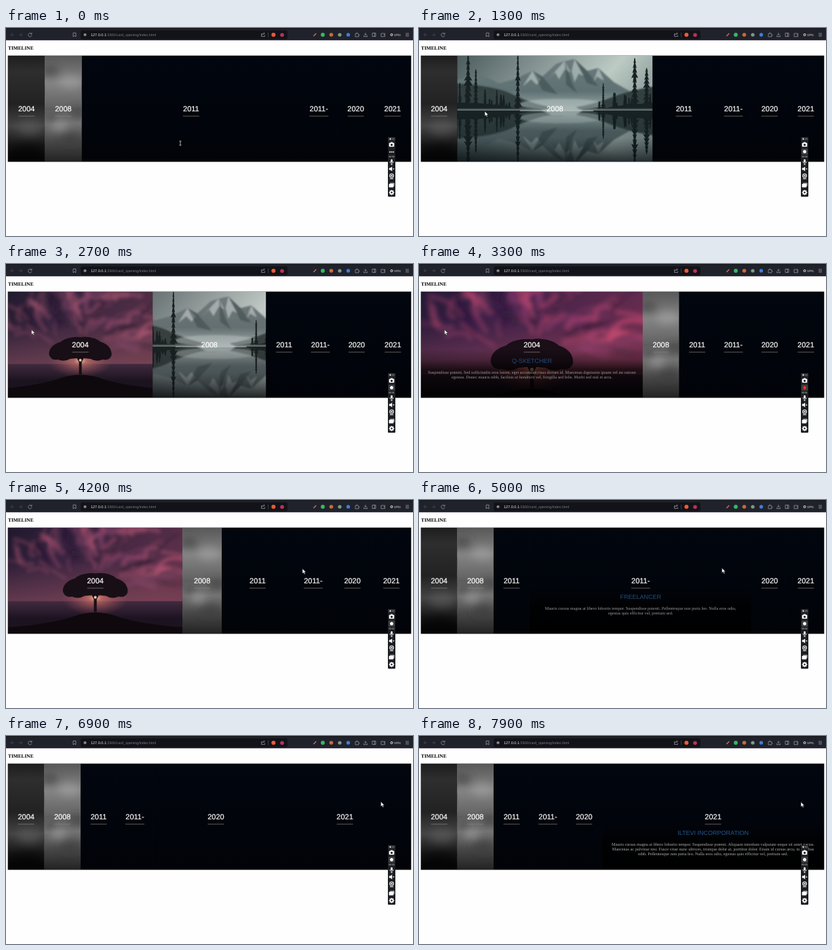
These frames come from a looping animation (600 by 307 pixels, 8000 ms). An HTML page:

```html
<!DOCTYPE html>
<html lang="en">
<head>
<meta charset="utf-8">
<title>Timeline</title>
<style>
html, body { margin: 0; width: 100%; height: 100%; overflow: hidden; background: #fefefe; }
svg { display: block; }
text { text-rendering: geometricPrecision; }
.sans { font-family: "Liberation Sans", Arial, sans-serif; }
.serif { font-family: "Liberation Serif", Times, serif; }
.mid { text-anchor: middle; }
.line { fill: none; stroke: #a3a5ae; stroke-width: .7; }
</style>
</head>
<body>
<svg id="stage" width="600" height="307" viewBox="0 0 600 307">
  <defs>
    <linearGradient id="night" x2="0" y2="1"><stop stop-color="#01060f"/><stop offset="1" stop-color="#010308"/></linearGradient>
    <linearGradient id="dusk" y2=".35"><stop stop-color="#1f1732"/><stop offset=".4" stop-color="#3d2148"/><stop offset="1" stop-color="#682c4e"/></linearGradient>
    <linearGradient id="low" x2="0" y2="1"><stop offset=".45" stop-color="#a34c5c" stop-opacity="0"/><stop offset="1" stop-color="#a34c5c" stop-opacity=".5"/></linearGradient>
    <linearGradient id="sea" x2="0" y2="1"><stop stop-color="#472845"/><stop offset=".5" stop-color="#1e1223"/></linearGradient>
    <radialGradient id="glow"><stop stop-color="#ffb98c"/><stop offset=".2" stop-color="#e56a5c" stop-opacity=".75"/><stop offset="1" stop-color="#b0405a" stop-opacity="0"/></radialGradient>
    <linearGradient id="mist" y2=".25"><stop stop-color="#46575b"/><stop offset=".45" stop-color="#869795"/><stop offset=".8" stop-color="#bccbc4"/><stop offset="1" stop-color="#98a8a4"/></linearGradient>
    <linearGradient id="rock" x2="0" y2="1"><stop offset=".1" stop-color="#68797c"/><stop offset=".6" stop-color="#5d7174"/><stop offset="1" stop-color="#a5b8b6"/></linearGradient>
    <linearGradient id="deep" x2="0" y2="1"><stop stop-color="#0c1c22" stop-opacity=".12"/><stop offset=".5" stop-color="#0a171c" stop-opacity=".32"/><stop offset="1" stop-color="#050c10" stop-opacity=".88"/></linearGradient>
    <linearGradient id="shade" x2="0" y2="1"><stop stop-color="#000" stop-opacity="0"/><stop offset=".22" stop-color="#000" stop-opacity=".3"/><stop offset=".42" stop-color="#000" stop-opacity=".75"/><stop offset="1" stop-color="#000" stop-opacity=".92"/></linearGradient>
    <linearGradient id="haze0" x2="0" y2="1"><stop stop-color="#1e1e1e"/><stop offset=".15" stop-color="#2e2e2e"/><stop offset=".45" stop-color="#222"/><stop offset=".66" stop-color="#444"/><stop offset=".84" stop-color="#141414"/><stop offset="1" stop-color="#060606"/></linearGradient>
    <linearGradient id="haze1" x2="0" y2="1"><stop stop-color="#585858"/><stop offset=".25" stop-color="#858585"/><stop offset=".5" stop-color="#606060"/><stop offset=".64" stop-color="#757575"/><stop offset=".8" stop-color="#484848"/><stop offset="1" stop-color="#222"/></linearGradient>
    <filter id="soft" x="-50%" y="-50%" width="200%" height="200%"><feGaussianBlur stdDeviation="6"/></filter>
    <filter id="cloud"><feGaussianBlur stdDeviation="2.6"/></filter>
    <filter id="far"><feGaussianBlur stdDeviation="1"/></filter>
  </defs>
  <rect width="600" height="307" fill="#fefefe"/>
  <g id="bar"></g>
  <text class="serif" x="3" y="32" font-size="7.35" font-weight="bold" fill="#000">TIMELINE</text>
  <g id="cards"></g>
  <g id="tool"></g>
  <g id="arrow"><path d="M0 0V7L1.7 5.5 2.9 8.1 4.1 7.6 2.9 5.1H5.1Z" fill="#fff" stroke="#222" stroke-width=".5"/></g>
  <path id="beam" d="M-1.5-3H1.5M-1.5 3H1.5M0-3V3" stroke="#ddd" stroke-width=".8"/>
</svg>
<script>
const $ = id => document.getElementById(id);
let seed = 11;
const rnd = (a, b) => a + (b - a) * ((seed = seed * 16807 % 2147483647) / 2147483647);
const many = (n, f) => Array.from({ length: n }, (_, i) => f(i)).join('');
const dot = (x, y, r, fill) => `<circle cx="${x}" cy="${y}" r="${r}" fill="${fill}"/>`;
const box = (x, y, w, h, fill, r = 0) => `<rect x="${x}" y="${y}" width="${w}" height="${h}" rx="${r}" fill="${fill}"/>`;
const line = (d, extra = '') => `<path class="line" d="${d}" ${extra}/>`;

// Browser bar
$('bar').innerHTML = box(0, 0, 600, 18, '#20222b') + box(0, 0, 600, 1.2, '#15161c') +
  box(0, 17.5, 600, .7, '#352f41') + box(110, 3.5, 305, 13, '#121319', 3) +
  line('M12 10H7M9.5 7.5 7 10l2.5 2.5M19 10h5M21.5 7.5 24 10l-2.5 2.5', 'style="stroke:#4b4e58"') +
  line('M37.6 8.6A2.7 2.7 0 1 0 38 11M38 6.8v2.2h-2.2M99 7.3h4v5.6l-2-1.7-2 1.7Z') + dot(116.5, 10, 2, '#a3a5ae') +
  box(116.1, 9.6, .8, 1.7, '#14151b') +
  `<text class="sans" x="125" y="12" font-size="5.5" fill="#eee">127.0.0.1<tspan font-size="5.35" fill="#777a84">:5500/card_opening/index.html</tspan></text>` +
  line('M378 8.5h-1.5v4h5v-2M378 10.5q0-2.5 3-2.5M379.7 6.5 381.3 8l-1.6 1.5') + box(386, 6.5, .6, 7, '#555863') +
  dot(394.3, 10, 3, '#ef5a35') + dot(407, 10.2, 2.8, '#b8325e') +
  line('M453.3 12 457.3 8', 'style="stroke:#d9704f;stroke-width:1.3"') +
  dot(467, 10, 2.9, '#35b866') + dot(479.5, 10, 2.8, '#c96c33') + dot(492, 10, 2.6, '#7f9b8b') + dot(504.5, 10, 2.7, '#3b7de0') +
  line('M515 8.5h1.4a1 1 0 1 1 1.8 0h1.3v1.3a1 1 0 1 1 0 1.8v1.3H515ZM530 7v3.5M528.3 9l1.7 1.7L531.7 9M527.5 11v1.7h5V11') +
  line('M540 7.5h5v5h-5ZM543.3 7.5v5M553 8h5.5v4.7H553ZM556.5 10h2') + dot(568.5, 10, 2, '#c9cad2') + dot(568.5, 10, .9, '#20222b') +
  `<text class="sans" x="572" y="12" font-size="4.7" fill="#ddd">VPN</text>` + line('M589 8h5M589 10h5M589 12h5');

// Scenes: x is centred on 0, y runs from 0 to 156
const tints = ['#e0507a', '#b8486f', '#8c3a70', '#251533'];
const streak = i => {
  const a = rnd(-2.7, -.1), r = rnd(40, 120), q = r + rnd(15, 50), b = a + rnd(-.1, .25);
  const p = (g, d) => `${(Math.cos(g) * d).toFixed(1)} ${(90 + Math.sin(g) * d * .75).toFixed(1)}`;
  return `<path d="M${p(a, r)}Q${p(a + rnd(-.15, .15), (r + q) / 2)} ${p(b, q)}" stroke="${tints[i % 4]}" stroke-width="${rnd(3, 9).toFixed(1)}" opacity="${rnd(.2, a > -1.9 ? .55 : .3).toFixed(2)}"/>`;
};
const tree = box(-130, 0, 260, 108, 'url(#dusk)') + '<g filter="url(#cloud)" fill="none" stroke-linecap="round">' + many(90, streak) + '</g>' +
  box(-130, 0, 260, 108, 'url(#low)') + box(-130, 106.5, 260, 50, 'url(#sea)') +
  '<ellipse cx="0" cy="102" rx="48" ry="25" fill="url(#glow)"/>' +
  '<path d="M-130 144Q-60 139-28 127Q0 118 28 127Q60 139 130 144V158H-130Z" fill="#10080f"/>' +
  '<path d="M-46 93C-47 84-40 77-29 74C-22 68-10 66 0 67C10 65 24 68 30 74C41 77 47 85 46 94Q43 102 33 100Q24 104 15 99L5 98 2 104 2 122H-2L-2 104-5 98-15 99Q-24 104-33 100Q-43 102-46 93Z" fill="#1a0e17"/>' +
  dot(0, 101, 2, '#ffc09a');

const spruce = (x, base, h, w) => {
  let l = '', r = '';
  for (let k = 1; k <= 10; k++) {
    const y = base - h + h * k / 10.5, d = w * (.25 + k * .075) * rnd(.5, 1.2);
    const edge = s => `L${(x + s * d).toFixed(1)} ${y.toFixed(1)}L${(x + s * d * .35).toFixed(1)} ${(y - .8).toFixed(1)}`;
    l += edge(-1);
    r += edge(1);
  }
  const half = s => `<path d="M${x} ${base - h}${s}L${x} ${base}Z"/>`;
  return half(l) + half(r) + box(x - .6, base - h, 1.2, h, '#141f21');
};
const shore = box(-145, 0, 290, 82, 'url(#mist)') + '<g filter="url(#far)">' +
  '<path d="M-145 38-105 30-80 42-58 36-32 24-18 32 2 14 14 10 28 7 46 24 62 20 84 40 112 56 145 60V84H-145Z" fill="url(#rock)"/>' +
  '<path d="M-32 24-20 36-26 44-34 36-46 46ZM14 10 22 26 14 22 6 36 0 26-12 38ZM28 7 42 32 34 28 28 40 24 24ZM62 20 70 38 60 32 54 42Z" fill="#b5c4c2" opacity=".7"/>' +
  '<path d="M-32 24-18 32 4 58-18 52ZM28 7 46 24 62 46 46 42ZM14 10 24 40 32 56 16 44Z" fill="#33474b" opacity=".5"/>' +
  '<path d="M-145 42Q-85 44-55 60Q-30 72-5 76L-20 83H-145ZM145 46Q105 52 80 62Q55 72 30 76L40 83H145Z" fill="#31413f"/>' +
  '<ellipse cx="10" cy="72" rx="60" ry="8" fill="#b3c3c1" opacity=".5"/></g>' +
  '<g fill="#182325">' + many(26, i => {
    const x = +rnd(50, 140).toFixed(1) * (i % 2 ? 1 : -1);
    return spruce(x, 80, rnd(8, 12 + Math.abs(x) * .2), 4);
  }) + spruce(-124, 80, 80, 8) + spruce(-113, 80, 58, 5) + spruce(-53, 80, 80, 6) + spruce(69, 80, 38, 4) + spruce(114, 80, 74, 8) + spruce(131, 80, 60, 7) +
  '<path d="M-145 70Q-100 68-60 77L-30 82H-145ZM145 70Q95 72 70 78L50 82H145Z"/></g>';
const lake = `<g id="shore">${shore}</g><use href="#shore" transform="matrix(1 0 0 -1 0 163)"/>` +
  box(-145, 81.5, 290, 76, 'url(#deep)') + box(-50, 80.6, 105, 1, '#b5c4c2', .5);

const blobs = (list, fill) => '<g filter="url(#soft)">' + list.map(([x, y, r]) => `<ellipse cx="${x}" cy="${y}" rx="${r}" ry="${r * .6}" fill="${fill}" opacity=".55"/>`).join('') + '</g>';
const hazes = [
  box(-60, 0, 120, 157, 'url(#haze0)') + blobs([[0, 152, 30]], '#000') + blobs([[4, 106, 18]], '#5c5c5c'),
  box(-60, 0, 120, 157, 'url(#haze1)') + blobs([[-20, 22, 14], [22, 84, 14], [-18, 92, 10], [12, 122, 16]], '#3a3a3a') + blobs([[10, 38, 16], [-6, 104, 12]], '#a5a5a5')
];

// Cards: year, title, text, hover changes [ms, open], scene and its width
const OPEN = 500;
const cards = [
  { year: '2004', title: 'Q-SKETCHER', hover: [[2532, 1], [4095, 0]], art: tree, size: 248,
    text: ['Suspendisse potenti. Sed sollicitudin eros lorem, eget accumsan risus dictum id. Maecenas dignissim ipsum vel mi rutrum', 'egestas. Donec mauris nibh, facilisis ut hendrerit vel, fringilla sed felis. Morbi sed nisl et arcu.'] },
  { year: '2008', title: 'ANIMATOR', hover: [[1020, 1], [2532, 0]], art: lake, size: 279,
    text: ['Maecenas dignissim ipsum vel mi rutrum egestas. Donec mauris nibh, facilisis ut hendrerit vel, fringilla sed felis.', 'Suspendisse potenti. Sed sollicitudin eros lorem, eget accumsan risus dictum id.'] },
  { year: '2011', title: 'WEB DEVELOPER', hover: [[-380, 1], [1020, 0], [4130, 1], [4200, 0]],
    text: ['Aliquam interdum vulputate neque sit amet varius. Maecenas ac pulvinar nisi. Fusce vitae nunc ultrices, tristique dolor', 'at, porttitor dolor. Etiam id cursus arcu, in dapibus nibh.'] },
  { year: '2011-', title: 'FREELANCER', hover: [[4200, 1], [5570, 0]],
    text: ['Mauris cursus magna at libero lobortis tempor. Suspendisse potenti. Pellentesque non porta leo. Nulla eros odio,', 'egestas quis efficitur vel, pretium sed.'] },
  { year: '2020', title: 'TEAM LEADER', hover: [[5570, 1], [6750, 0]],
    text: ['Fusce vitae nunc ultrices, tristique dolor at, porttitor dolor. Etiam id cursus arcu, in dapibus nibh. Pellentesque', 'non porta leo. Nulla eros odio, egestas quis efficitur vel, pretium sed.'] },
  { year: '2021', title: 'ILTEVI INCORPORATION', hover: [[6750, 1]],
    text: ['Mauris cursus magna at libero lobortis tempor. Suspendisse potenti. Aliquam interdum vulputate neque sit amet varius.', 'Maecenas ac pulvinar nisi. Fusce vitae nunc ultrices, tristique dolor at, porttitor dolor. Etiam id cursus arcu, in dapibus', 'nibh. Pellentesque non porta leo. Nulla eros odio, egestas quis efficitur vel, pretium sed.'] }
];
$('cards').innerHTML = box(2.7, 40.7, 594.6, 156.8, '#06070b') + cards.map(c => {
  const i = cards.indexOf(c), half = c.year.length > 4 ? 14 : 12;
  return `<svg class="card" y="41" height="156">
    <rect width="600" height="156" fill="url(#night)"/>
    <g class="art">${c.art || ''}</g>
    <g class="haze">${hazes[i] || ''}</g>
    <rect class="shade" y="85" width="600" height="71" fill="url(#shade)"/>
    <g class="mid label"><text class="sans" y="82" font-size="11" fill="#fff" stroke="#fff" stroke-width=".2">${c.year}</text>
      <rect x="${-half}" y="88.7" width="${2 * half}" height=".7" fill="#8a837a"/>
      <g class="info"><text class="sans" y="105.2" font-size="9" fill="#25588f">${c.title}</text>
      ${c.text.map((s, k) => `<text class="serif" y="${120.8 + 7.3 * k}" font-size="6.29" fill="#b4b4b4">${s}</text>`).join('')}</g></g>
  </svg>`;
}).join('');
document.querySelectorAll('.card').forEach((el, i) => {
  cards[i].el = el;
  for (const part of ['art', 'haze', 'shade', 'label', 'info']) cards[i][part] = el.querySelector('.' + part);
});

// Recorder panel
$('tool').innerHTML = box(563, 161, 11, 88, '#1d1e22', 1.2) + box(563, 161, 11, 5.5, '#2c2d32', 1) + dot(566.5, 163.8, 1.2, '#ddd') + box(569, 163.4, 3.5, .8, '#999') +
  box(564.7, 169.6, 7.6, 5.6, '#fff', 1) + box(566.8, 168.6, 3.4, 2, '#fff', .5) + dot(568.5, 172.4, 1.6, '#1d1e22') +
  '<g id="dots">' + many(3, i => dot(566 + 2.5 * i, 183, .9, '#fff')) + '</g>' +
  `<g id="rec">${line('M564.8 179h7.4v7h-7.4Z', 'style="stroke:#777"')}<circle id="led" cx="568.5" cy="182.5" r="2.5"/></g>` +
  '<text id="clock" class="sans mid" x="568.5" y="190.6" font-size="3.4" fill="#ddd"></text>' +
  box(567.2, 193.8, 2.6, 4.8, '#fff', 1.3) + line('M565.8 197a2.7 2.7 0 0 0 5.4 0M568.5 199.8v1.8M567 201.6h3', 'style="stroke:#fff"') +
  '<path d="M564.8 206.6h2l2.4-2v7l-2.4-2h-2Z" fill="#fff"/>' + line('M570.3 207l2 2M572.3 207l-2 2', 'style="stroke:#fff"') +
  dot(568.5, 218, 3.3, '#fff') + dot(568.5, 218, 2.2, '#1d1e22') + dot(568.5, 218, 1.2, '#fff') + box(565.8, 222, 5.4, 1, '#fff', .5) +
  box(566, 228.6, 6.6, 5, '#aaa', .7) + box(564.6, 230, 6.6, 5.2, '#fff', .7) +
  many(4, i => `<rect x="567.7" y="239" width="1.6" height="7.6" fill="#fff" transform="rotate(${45 * i} 568.5 242.8)"/>`) + dot(568.5, 242.8, 2.8, '#fff') + dot(568.5, 242.8, 1.2, '#1d1e22');

// Standard "ease" curve
function ease(x) {
  if (x <= 0) return 0;
  if (x >= 1) return 1;
  let a = 0, b = 1, u;
  for (let i = 0; i < 20; i++) {
    u = (a + b) / 2;
    if (.75 * u * (1 - u) + u ** 3 < x) a = u; else b = u;
  }
  return .3 * u * (1 - u) ** 2 + 3 * u * u * (1 - u) + u ** 3;
}
function state(hover, t) {
  let open = 0, fade = 0;
  hover.forEach(([from, to], i) => {
    if (t < from) return;
    const end = Math.min(t, hover[i + 1] ? hover[i + 1][0] : Infinity);
    const way = to - open;
    fade = to ? ease((t - from - OPEN) / OPEN) : 0;
    if (way) open += way * ease((end - from) / (OPEN * Math.abs(way)));
  });
  return { open, fade };
}
const path = [[0, 257, 170], [800, 257, 168], [1050, 108, 130], [1300, 97, 123], [2420, 90, 116], [2700, 37.5, 97], [3910, 37.5, 97],
  [4200, 437, 101.5], [5450, 452, 100], [5600, 495, 98], [6100, 528, 96.5], [6650, 530, 96.5], [6800, 550, 97], [7300, 563, 97.5], [8000, 563, 97.5]];
function pointer(t) {
  const i = path.findIndex(p => p[0] > t), [t0, x0, y0] = path[i - 1], [t1, x1, y1] = path[i];
  const k = (t - t0) / (t1 - t0);
  return `translate(${x0 + (x1 - x0) * k} ${y0 + (y1 - y0) * k})`;
}
const show = (el, on) => el.setAttribute('opacity', on);

function draw(now) {
  const t = now % 8000;
  const states = cards.map(c => state(c.hover, t));
  const unit = 594 / states.reduce((sum, s) => sum + 1 + 5.12 * s.open, 0);
  let x = 3;
  cards.forEach((c, i) => {
    const { open, fade } = states[i], w = unit * (1 + 5.12 * open);
    c.el.setAttribute('x', x);
    c.el.setAttribute('width', w);
    c.label.setAttribute('transform', `translate(${w / 2} 0)`);
    show(c.info, fade);
    show(c.shade, Math.min(1, fade * 3));
    if (c.art.firstChild) {
      const s = Math.max(1, w / c.size);
      c.art.setAttribute('transform', `translate(${w / 2} ${(c.size < 260 ? 57 : 81) * (1 - s)}) scale(${s})`);
      c.art.style.filter = `grayscale(${(1 - open) * .8})`;
      c.haze.setAttribute('transform', `translate(${w / 2} 0)`);
      show(c.haze, Math.max(0, 1 - open * 4));
    }
    x += w;
  });
  const text = t < 850, beat = t % 1400;
  $('arrow').setAttribute('transform', pointer(t));
  $('beam').setAttribute('transform', pointer(t));
  show($('arrow'), +!text);
  show($('beam'), +text);
  show($('dots'), +(t < 300));
  show($('rec'), +(t >= 300));
  $('led').setAttribute('fill', beat >= 300 && beat < 800 ? '#e0362f' : '#fff');
  $('clock').textContent = '00:0' + Math.floor(t / 2000);
}
function loop() {
  draw(performance.now());
  requestAnimationFrame(loop);
}
loop();
</script>
</body>
</html>
```
